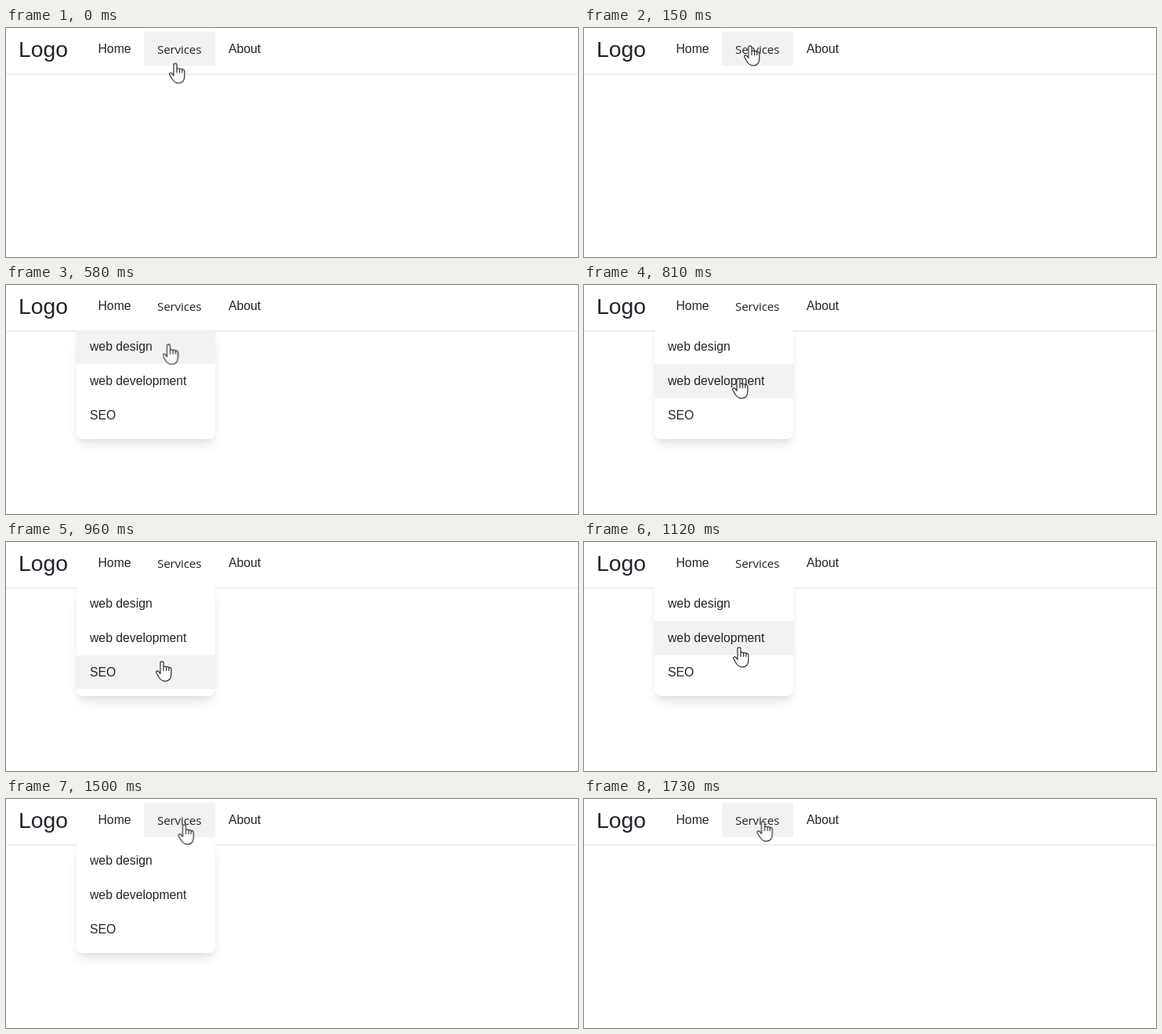
Recreate the animation shown at these times as an HTML page. Size 730 px wide and 293 px high, loop 1800 ms.

```html
<!DOCTYPE html>
<html lang="en">
<head>
<meta charset="utf-8">
<title>Dropdown menu</title>
<style>
html, body { margin: 0; width: 100%; height: 100%; overflow: hidden; background: #fff; }
header, .panel, svg { position: absolute; }
header {
  left: 0; right: 0; top: 0; height: 58px; background: #fff;
  box-shadow: 0 1px 3px rgba(0,0,0,.13);
}
.panel {
  left: 90px; top: 52px; width: 177px; height: 145px;
  background: #fff; border-radius: 0 0 8px 8px;
  box-shadow: 0 10px 15px -3px rgba(0,0,0,.1), 0 4px 6px -2px rgba(0,0,0,.05);
}
svg { left: 0; top: 0; }
text { font: 15.75px "Liberation Sans", Arial, sans-serif; fill: #24232b; }
.brand { font-size: 28.3px; }
.button { font: 15.3px "Open Sans", "Noto Sans", sans-serif; letter-spacing: -.2px; }
.hover { fill: #f2f2f2; }
.hand { fill: #fff; stroke: #33323a; stroke-width: 1.25; stroke-linejoin: round; stroke-linecap: round; }

.panel, .menu, .hover, .hand { animation: 1800ms step-end infinite; }
.panel, .menu { animation-name: open; }
.services { animation-name: services; }
.first { animation-name: first; }
.second { animation-name: second; }
.third { animation-name: third; }
.hand { animation-name: move; }

/* 1% = 18 ms */
@keyframes open {
  0%, 96.111% { visibility: hidden; }
  8.889% { visibility: visible; }
}
@keyframes services {
  0%, 78.889% { visibility: visible; }
  32.222% { visibility: hidden; }
}
@keyframes first {
  0%, 41.111%, 78.889% { visibility: hidden; }
  32.222%, 70.556% { visibility: visible; }
}
@keyframes second {
  0%, 53.333%, 70.556% { visibility: hidden; }
  41.111%, 57.778% { visibility: visible; }
}
@keyframes third {
  0%, 57.778% { visibility: hidden; }
  53.333% { visibility: visible; }
}
@keyframes move {
  0%      { transform: translate(216px, 44.5px); }
  4.444%  { transform: translate(212px, 22px); }
  8.889%  { transform: translate(208px, 3px); }
  13.889% { transform: translate(207px, 15.5px); }
  17.778% { transform: translate(208px, 16px); }
  26.667% { transform: translate(208px, 42px); }
  32.222% { transform: translate(207.5px, 75.5px); }
  36.667% { transform: translate(205px, 92px); }
  41.111% { transform: translate(201px, 107px); }
  45%     { transform: translate(197px, 119px); }
  48.889% { transform: translate(198px, 134px); }
  53.333% { transform: translate(199px, 152px); }
  57.778% { transform: translate(199px, 144px); }
  62.222% { transform: translate(198px, 134px); }
  66.667% { transform: translate(203px, 112px); }
  70.556% { transform: translate(208px, 90px); }
  75%     { transform: translate(215px, 66px); }
  78.889% { transform: translate(223px, 45px); }
  83.333% { transform: translate(227.5px, 32px); }
  87.778% { transform: translate(238px, 14px); }
  96.111% { transform: translate(228.5px, 28px); }
}
</style>
</head>
<body>
<header></header>
<div class="panel"></div>
<svg width="730" height="293" viewBox="0 0 730 293">
  <rect class="hover services" x="176" y="4.5" width="91" height="44"/>
  <text class="brand" x="16" y="36.5">Logo</text>
  <text x="117.5" y="32">Home</text>
  <text class="button" x="193" y="33">Services</text>
  <text x="284" y="32">About</text>

  <rect class="hover first" x="90" y="58" width="177" height="43"/>
  <rect class="hover second" x="90" y="101" width="177" height="44"/>
  <rect class="hover third" x="90" y="145" width="177" height="43"/>
  <g class="menu">
    <text x="107" y="84">web design</text>
    <text x="107" y="128">web development</text>
    <text x="107" y="171.5">SEO</text>
  </g>

  <path class="hand" d="M-2 2.4C-2 .2 2 .2 2 2.4V8.5C2.2 6.4 5.6 6.6 5.6 8.8C5.8 7 8.8 7.2 8.8 9.4C9.2 8 11.8 8.2 11.8 10.6V17C11.8 23 9 26 4 26C-.5 26 -2.5 23.5 -4.2 20.5L-7.1 15.5C-8.1 13.2 -5.5 12 -4 14L-2 16.3ZM2 8.5V12.5M5.6 8.8V12.5M8.8 9.4V12.5"/>
</svg>
</body>
</html>
```
